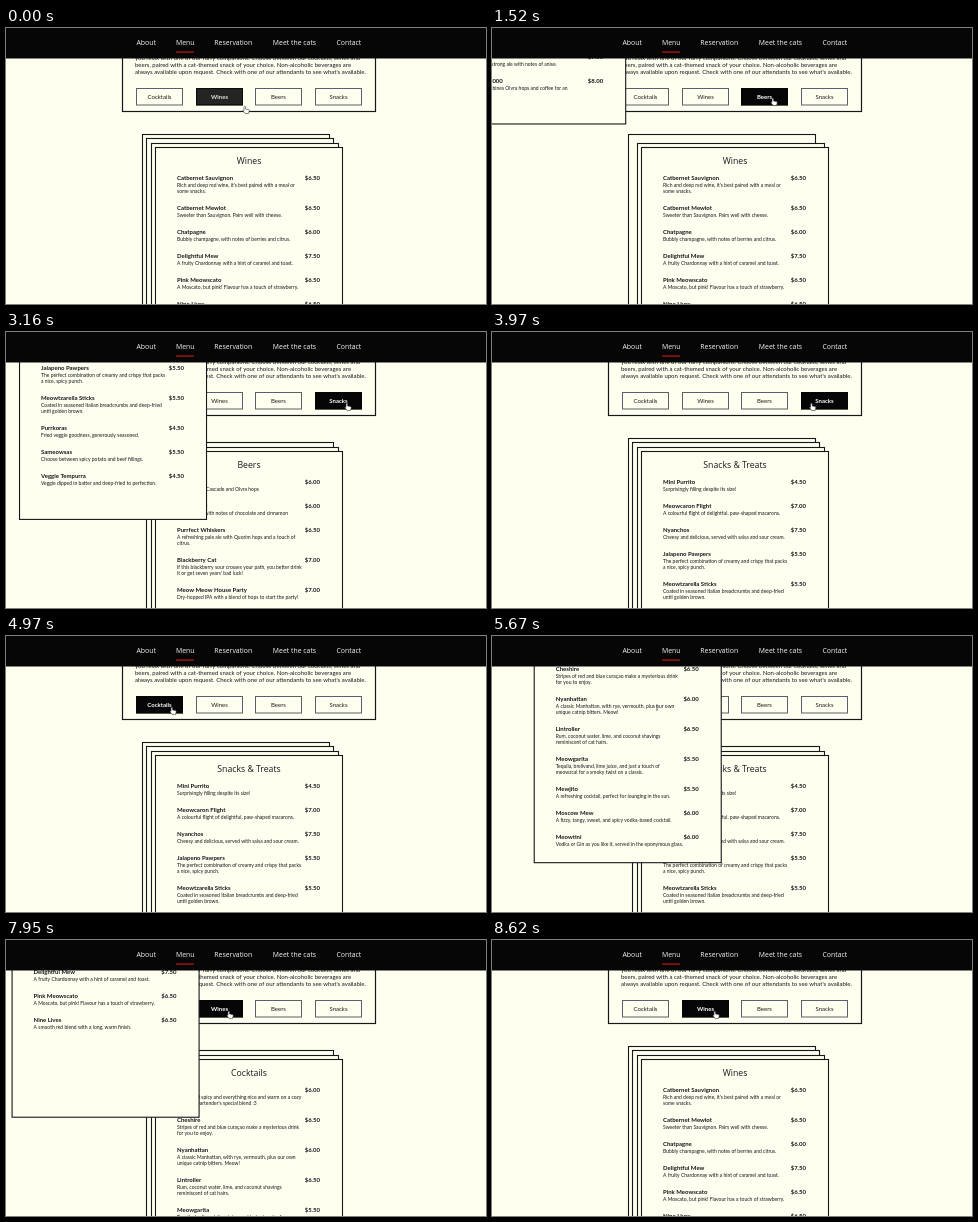
These frames come from a looping animation (480x276 px, 8.7 s). An HTML page with a canvas:

```html
<!DOCTYPE html>
<html lang="en">
<head>
<meta charset="utf-8">
<title>Cat café menu</title>
<style>
html, body { margin: 0; width: 100%; height: 100%; overflow: hidden; background: #fffff0; }
canvas { display: block; width: 480px; height: 276px; }
</style>
</head>
<body>
<canvas></canvas>
<script>
const LOOP = 8700, FLY = 500, SHIFT = 150;
const PAPER = '#fffff0', INK = '#15151c';
const CARD_W = 187, CARD_H = 254, FAR = [-54, -159];
const LATO = 'Lato, "Open Sans", sans-serif', SANS = '"Open Sans", "Noto Sans", sans-serif';

const canvas = document.querySelector('canvas');
const scale = window.devicePixelRatio || 1;
canvas.width = 480 * scale;
canvas.height = 276 * scale;
const ctx = canvas.getContext('2d');

// Each item: name, price, description lines
const menus = {
  Cocktails: [
    ['Cat Nip', '6.00', 'Sweet and spicy and everything nice and warm on a cozy', "evening. Bartender's special blend :3"],
    ['Cheshire', '6.50', 'Stripes of red and blue curaçao make a mysterious drink', 'for you to enjoy.'],
    ['Nyanhattan', '6.00', 'A classic Manhattan, with rye, vermouth, plus our own', 'unique catnip bitters. Meow!'],
    ['Lintroller', '6.50', 'Rum, coconut water, lime, and coconut shavings', 'reminiscent of cat hairs.'],
    ['Meowgarita', '5.50', 'Tequila, brelivand, lime juice, and just a touch of', 'meowzcal for a smoky twist on a classic.'],
    ['Mewjito', '5.50', 'A refreshing cocktail, perfect for lounging in the sun.'],
    ['Moscow Mew', '6.00', 'A fizzy, tangy, sweet, and spicy vodka-based cocktail.'],
    ['Meowtini', '6.00', 'Vodka or Gin as you like it, served in the eponymous glass.']
  ],
  Wines: [
    ['Catbernet Sauvignon', '6.50', "Rich and deep red wine, it's best paired with a meal or", 'some snacks.'],
    ['Catbernet Mewlot', '6.50', 'Sweeter than Sauvignon. Pairs well with cheese.'],
    ['Chatpagne', '6.00', 'Bubbly champagne, with notes of berries and citrus.'],
    ['Delightful Mew', '7.50', 'A fruity Chardonnay with a hint of caramel and toast.'],
    ['Pink Meowscato', '6.50', 'A Moscato, but pink! Flavour has a touch of strawberry.'],
    ['Nine Lives', '6.50', 'A smooth red blend with a long, warm finish.']
  ],
  Beers: [
    ['Catnip Ale', '6.00', 'Brewed with Cascade and Olvra hops'],
    ['Tabby Kitty', '6.00', 'A dark lager with notes of chocolate and cinnamon'],
    ['Purrfect Whiskers', '6.50', 'A refreshing pale ale with Quorim hops and a touch of', 'citrus.'],
    ['Blackberry Cat', '7.00', 'If this blackberry sour crosses your path, you better drink', "it or get seven years' bad luck!"],
    ['Meow Meow House Party', '7.00', 'Dry-hopped IPA with a blend of hops to start the party!'],
    ['Paw Pilsner', '6.00', 'Crisp and light, with a clean finish.'],
    ['Hairball', '7.50', 'A surprisingly strong ale with notes of anise.'],
    ['Meowster 3000', '8.00', 'This stout combines Olvra hops and coffee for an', 'extra kick.']
  ],
  Snacks: [
    ['Mini Purrito', '4.50', 'Surprisingly filling despite its size!'],
    ['Meowcaron Flight', '7.00', 'A colourful flight of delightful, paw-shaped macarons.'],
    ['Nyanchos', '7.50', 'Cheesy and delicious, served with salsa and sour cream.'],
    ['Jalapeno Pawpers', '5.50', 'The perfect combination of creamy and crispy that packs', 'a nice, spicy punch.'],
    ['Meowtzarella Sticks', '5.50', 'Coated in seasoned Italian breadcrumbs and deep-fried', 'until golden brown.'],
    ['Purrkoras', '4.50', 'Fried veggie goodness, generously seasoned.'],
    ['Sameowsas', '5.50', 'Choose between spicy potato and beef fillings.'],
    ['Veggie Tempurra', '4.50', 'Veggie dipped in batter and deep-fried to perfection.']
  ]
};
const tabs = Object.keys(menus);
const firstDeck = ['Wines', 'Cocktails', 'Beers', 'Snacks'];
const flights = [[1290, 'Beers'], [2856, 'Snacks'], [5350, 'Cocktails'], [7650, 'Wines']];

// Cursor stops: time, x, y
const stops = [
  [40, 238, 78], [820, 280, 70], [2070, 280, 70], [2740, 340, 71], [3710, 340, 71],
  [4900, 165, 71], [6250, 165, 71], [7050, 222, 71], [LOOP, 222, 71]
];

const lerp = (a, b, k) => a + (b - a) * k;
const clamp = v => Math.min(1, Math.max(0, v));
const smooth = k => k * k * (3 - 2 * k);
const slot = i => [Math.floor(149.5 - 4.5 * i) + .5, Math.floor(119.5 - 4.5 * i) + .5];
const mix = (a, b, k) => [lerp(a[0], b[0], k), lerp(a[1], b[1], k)];

// cubic-bezier(.25, .1, .25, 1)
function ease(x) {
  const curve = (a, b, s) => 3 * a * s * (1 - s) ** 2 + 3 * b * s * s * (1 - s) + s ** 3;
  let lo = 0, hi = 1;
  for (let i = 0; i < 20; i++) {
    const mid = (lo + hi) / 2;
    if (curve(.25, .25, mid) < x) lo = mid; else hi = mid;
  }
  return curve(.1, 1, lo);
}

function cursorAt(t) {
  const i = stops.findIndex(s => s[0] > t);
  if (i < 1) return stops[0].slice(1);
  const a = stops[i - 1], b = stops[i];
  return mix(a.slice(1), b.slice(1), smooth((t - a[0]) / (b[0] - a[0])));
}

const tabX = i => 130.5 + 59.6 * i;

// Hover fades in and out over the last 160 ms
function hover(i, t) {
  let sum = 0;
  for (let k = 0; k < 8; k++) {
    const [x, y] = cursorAt((t - k * 20 + LOOP) % LOOP);
    if (x > tabX(i) && x < tabX(i) + 46 && y < 77) sum++;
  }
  return sum / 8;
}

// Cards from back to front with their positions
function cardsAt(t) {
  let deck = firstDeck, cards = null;
  for (const [start, name] of flights) {
    const u = t - start;
    if (u < 0) break;
    const old = deck, from = old.indexOf(name);
    deck = [name, ...old.filter(n => n !== name)];
    if (u < FLY + SHIFT) {
      const k = ease(clamp((u - FLY) / SHIFT)), half = FLY / 2;
      const place = n => n === name
        ? (u < half ? mix(slot(from), FAR, ease(u / half)) : mix(FAR, slot(0), ease(clamp(u / half - 1))))
        : mix(slot(old.indexOf(n)), slot(deck.indexOf(n)), k);
      cards = (u < half ? old : deck).map(n => ({ name: n, pos: place(n), flying: n === name && u < FLY }));
    } else cards = null;
  }
  return (cards || deck.map((name, i) => ({ name, pos: slot(i) }))).reverse();
}

function text(str, x, y, font, color = INK, align = 'left') {
  ctx.font = font;
  ctx.fillStyle = color;
  ctx.textAlign = align;
  ctx.fillText(str, x, y);
}

function box(x, y, w, h, fill, stroke, line = 1) {
  ctx.fillStyle = fill;
  ctx.strokeStyle = stroke;
  ctx.lineWidth = line;
  ctx.fillRect(x, y, w, h);
  ctx.strokeRect(x, y, w, h);
}

function drawIntro(t) {
  box(116.5, -20, 253, 103.5, PAPER, INK, 1.2);
  [
    'you relax with one of our furry companions. Choose between our cocktails, wines and',
    'beers, paired with a cat-themed snack of your choice. Non-alcoholic beverages are',
    "always available upon request. Check with one of our attendants to see what's available."
  ].forEach((line, i) => text(line, 129, 32.3 + 6.7 * i, '6px ' + LATO));
  tabs.forEach((tab, i) => {
    const h = hover(i, t), x = Math.floor(tabX(i)) + .5;
    box(x, 60.5, 46, 16.5, PAPER, '#5c5f6b');
    ctx.globalAlpha = h;
    box(x, 60.5, 46, 16.5, '#050505', '#050505');
    ctx.globalAlpha = 1;
    const shade = Math.round(lerp(24, 255, h));
    text(tab, x + 23, 71, (h > .5 ? 'bold ' : '') + '6px ' + LATO, `rgb(${shade},${shade},${shade})`, 'center');
  });
}

function drawCard({ name, pos: [x, y] }) {
  box(x, y, CARD_W, CARD_H, PAPER, INK, 1.1);
  text(name === 'Snacks' ? 'Snacks & Treats' : name, x + CARD_W / 2, y + 16.8, '8.7px ' + SANS, INK, 'center');
  let row = y + 32.6;
  for (const [item, price, ...lines] of menus[name]) {
    text(item, x + 21.5, row, 'bold 6px ' + LATO);
    text('$' + price, x + 164.5, row, 'bold 6px ' + LATO, INK, 'right');
    lines.forEach((line, i) => text(line, x + 21.5, row + 7.2 + 6 * i, '5px ' + LATO));
    row += 18 + 6 * lines.length;
  }
}

function drawHeader() {
  ctx.fillStyle = '#060606';
  ctx.fillRect(0, 0, 480, 30.5);
  [['About', 130.5], ['Menu', 170], ['Reservation', 208.3], ['Meet the cats', 266.8], ['Contact', 330.5]]
    .forEach(([label, x]) => text(label, x, 17.4, '6.9px ' + SANS, '#f4f4f4'));
  ctx.fillStyle = '#c4161c';
  ctx.fillRect(170, 23.5, 18, 1.2);
}

const hand = new Path2D('M0 .8Q.8 -.4 1.6 .8V3L4.6 3.6Q5.4 3.9 5.2 5L4.5 7.5H1.2L-1 4.8Q-.9 3.7 0 4.3Z');
const beam = new Path2D('M-1 -2H1M0 -2V3M-1 3H1');

function drawCursor([x, y], covered) {
  ctx.save();
  ctx.translate(x, y);
  ctx.lineWidth = .6;
  ctx.strokeStyle = '#333';
  ctx.fillStyle = '#fff';
  if (covered) ctx.stroke(beam);
  else {
    ctx.fill(hand);
    ctx.stroke(hand);
  }
  ctx.restore();
}

function draw(t) {
  ctx.setTransform(scale, 0, 0, scale, 0, 0);
  ctx.fillStyle = PAPER;
  ctx.fillRect(0, 0, 480, 276);
  drawIntro(t);
  const cards = cardsAt(t), [cx, cy] = cursorAt(t);
  cards.forEach(drawCard);
  drawHeader();
  const covered = cards.some(({ flying, pos: [x, y] }) =>
    flying && cx > x && cx < x + CARD_W && cy > y && cy < y + CARD_H);
  drawCursor([cx, cy], covered);
}

let begin;
function tick(now) {
  begin ??= now;
  draw((now - begin) % LOOP);
  requestAnimationFrame(tick);
}
requestAnimationFrame(tick);
</script>
</body>
</html>
```
